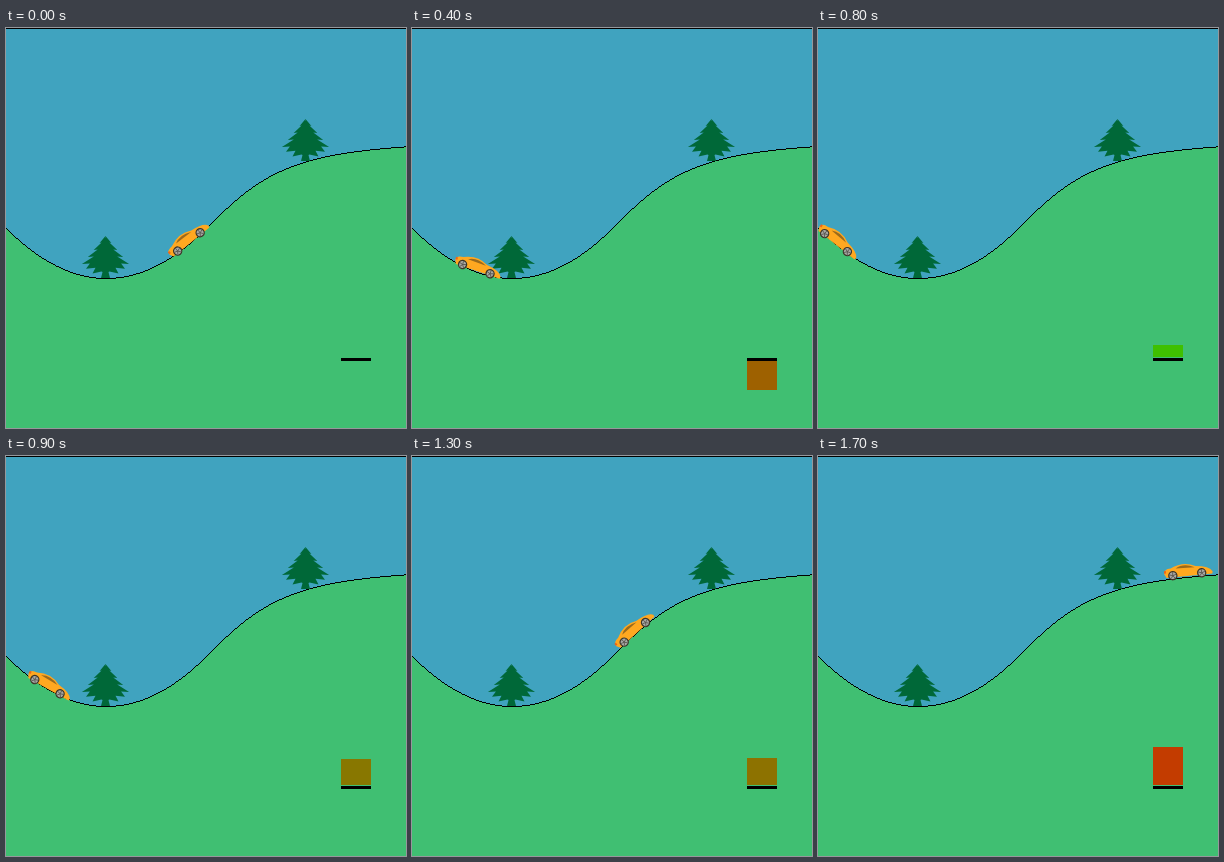
An HTML page with a canvas that plays this animation: 400 px wide and 400 px high, repeating every 1.8 s.

```html
<!DOCTYPE html>
<html lang="en">
<head>
<meta charset="utf-8">
<title>Car on the hill</title>
<style>
html, body { margin: 0; width: 100%; height: 100%; overflow: hidden; }
canvas { display: block; width: 400px; height: 400px; }
</style>
</head>
<body>
<canvas id="stage" width="400" height="400"></canvas>
<script>
const ctx = document.getElementById('stage').getContext('2d');
const SIZE = 400, STEP = 100, MAX_SPEED = 3, GRAVITY = 9.81;
// Throttle direction for each control step: rock back, then full ahead
const THROTTLE = '---++-'.padEnd(17, '+');

const hill = p => p < 0 ? p * p + p : p / Math.sqrt(1 + 5 * p * p);
const slope = p => p < 0 ? 2 * p + 1 : (1 + 5 * p * p) ** -1.5;
const bend = p => p < 0 ? 2 : -15 * p * (1 + 5 * p * p) ** -2.5;
const toX = p => 200 + 200 * p;
const toY = p => 200 - 200 * hill(p);

function simulate(p, v) {
  const states = [{ p, v }];
  const dt = 0.001;
  for (const sign of THROTTLE) {
    const u = sign === '+' ? 4 : -4;
    for (let i = 0; i < 100; i++) {
      const s = slope(p);
      const a = (u - GRAVITY * s - v * v * s * bend(p)) / (1 + s * s);
      p += v * dt;
      v += a * dt;
    }
    states.push({ p, v });
  }
  return states;
}

function rect(color, x, y, w, h) {
  ctx.fillStyle = color;
  ctx.fillRect(x, y, w, h);
}

function disc(color, x, y, r) {
  ctx.beginPath();
  ctx.arc(x, y, r, 0, 2 * Math.PI);
  ctx.fillStyle = color;
  ctx.fill();
}

function drawLand() {
  rect('#40a3bf', 0, 0, SIZE, SIZE);
  rect('#000', 0, 0, SIZE, 1);
  for (let x = 0; x < SIZE; x++) {
    const y = Math.round(toY((x - 199.99) / 200));
    rect('#40bf72', x, y, 1, SIZE - y);
    rect('#000', x, y, 1, 1);
  }
}

function treeHalf(side) {
  const line = (x, y) => ctx.lineTo(side * x, y);
  ctx.beginPath();
  ctx.moveTo(0, 0);
  // Branches widen downwards, then draw in around the trunk
  for (let i = 1; i <= 4; i++) {
    line(5.9 * i, 7 * i);
    line(3.9 * i, 7 * i - 0.5);
  }
  for (let i = 1; i <= 2; i++) {
    line(26 - 6.5 * i, 28 + 4.7 * i);
    line(16 - 6 * i, 28 + 3.7 * i);
  }
  line(3, 36);
  line(4.5, 42);
  line(0, 42);
  ctx.fill();
}

function drawTree(p) {
  ctx.save();
  ctx.translate(toX(p) - 0.5, Math.round(toY(p)) - 42);
  ctx.fillStyle = '#006838';
  treeHalf(1);
  treeHalf(-1);
  rect('#006838', -1, 2, 2, 40);
  ctx.restore();
}

function drawWheel(x, y) {
  disc('#3c3428', x, y, 4.7);
  disc('#a8a8a4', x, y, 3.4);
  ctx.strokeStyle = '#55524c';
  ctx.lineWidth = 0.8;
  ctx.beginPath();
  for (let i = 0; i < 5; i++) {
    const a = i * 0.4 * Math.PI - Math.PI / 2;
    ctx.moveTo(x, y);
    ctx.lineTo(x + 3.4 * Math.cos(a), y + 3.4 * Math.sin(a));
  }
  ctx.stroke();
}

function drawCar(p) {
  ctx.save();
  ctx.translate(toX(p), toY(p) - 6);
  ctx.rotate(-Math.atan(slope(p)));

  const body = new Path2D('M-24 1Q-24-4-17-4Q-4-10.5 8-4Q22-2.5 24.5 3L24 5H-22Z');
  const glass = new Path2D('M-12-3.5Q-4-8.5 7-3Z');
  ctx.fillStyle = '#ffa820';
  ctx.fill(body);
  ctx.fillStyle = '#9a6a1c';
  ctx.fill(glass);
  rect('#f06418', -24, -2, 2, 2.5);
  drawWheel(-15.5, 3.3);
  drawWheel(13.5, 3.3);
  ctx.restore();
}

function drawSpeed(v) {
  const ratio = Math.min(Math.abs(v) / MAX_SPEED, 1);
  const h = Math.floor(ratio * 50);
  const red = Math.round(255 * ratio);
  rect(`rgb(${red},${255 - red},0)`, 335, v < 0 ? 332 : 329 - h, 30, h);
  rect('#000', 335, 330, 30, 3);
}

const states = simulate(-0.092, 0);
const start = performance.now();
let shown = -1;

function tick() {
  const elapsed = performance.now() - start;
  const i = Math.floor(elapsed / STEP) % states.length;
  if (i !== shown) {
    shown = i;
    drawLand();
    drawTree(-0.5);
    drawTree(0.5);
    drawCar(states[i].p);
    drawSpeed(states[i].v);
  }
  requestAnimationFrame(tick);
}
tick();
</script>
</body>
</html>
```
